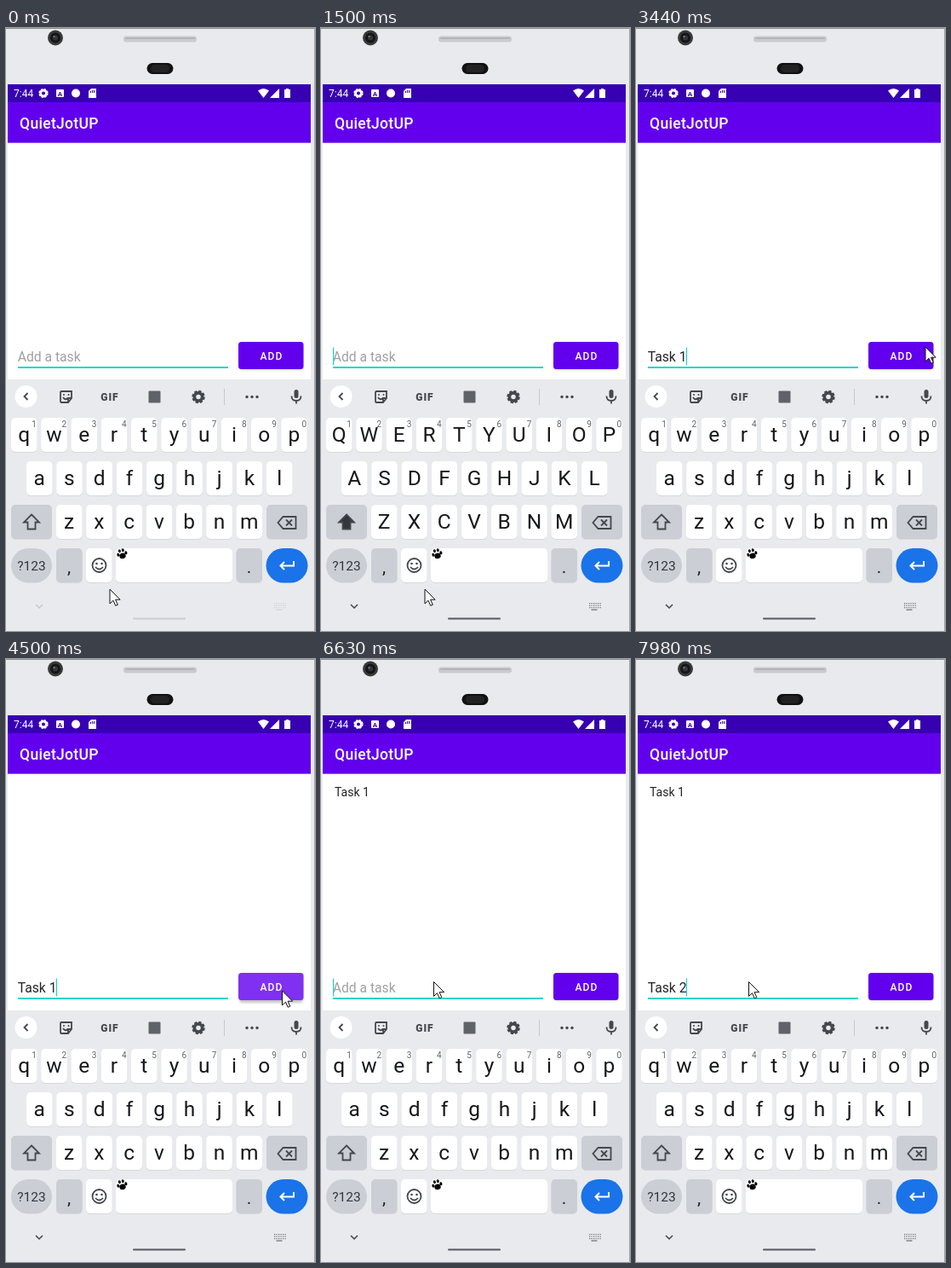
Recreate the animation shown at these times as an HTML page. Size 363x707 px, loop 8000 ms.

```html
<!DOCTYPE html>
<html lang="en">
<head>
<meta charset="utf-8">
<style>
html, body { margin: 0; width: 100%; height: 100%; overflow: hidden; background: #e8eaed; }
svg { display: block; font-family: Roboto, Arial, sans-serif; }
.key { font-size: 24.5px; text-anchor: middle; fill: #17181a; }
.digit { font-size: 10px; text-anchor: middle; fill: #5f6368; }
.line { fill: none; stroke: #44474b; stroke-width: 1.8; }
</style>
</head>
<body>
<svg id="stage" width="363" height="707" viewBox="0 0 363 707"></svg>
<script>
const LOOP = 8000;
const stage = document.getElementById('stage');

const rect = (x, y, w, h, fill, r = 0, more = '') =>
  `<rect x="${x}" y="${y}" width="${w}" height="${h}" rx="${r}" fill="${fill}" ${more}/>`;
const circle = (x, y, r, fill, more = '') =>
  `<circle cx="${x}" cy="${y}" r="${r}" fill="${fill}" ${more}/>`;
const text = (x, y, size, fill, s, more = '') =>
  `<text x="${x}" y="${y}" font-size="${size}" fill="${fill}" ${more}>${s}</text>`;
const path = (d, more = 'class="line"') => `<path d="${d}" ${more}/>`;
const fill = color => `fill="${color}"`;

function gear(x, y, r, color) {
  const step = r * Math.PI / 4;
  return circle(x, y, r * .62, 'none', `stroke="${color}" stroke-width="${r * .5}"`) +
    circle(x, y, r * .88, 'none', `stroke="${color}" stroke-width="${r * .3}" ` +
      `stroke-dasharray="${step * .55} ${step * .333}"`);
}

function phone() {
  return rect(0, 0, 363, 707, '#e8eaed') + rect(0, 0, 363, 1, '#8b8b8b') +
    rect(362, 0, 1, 707, '#a5a5a8') +
    circle(58, 11.5, 9, '#3a3a3a') + circle(58, 11.5, 6, '#161616') +
    circle(58, 11.5, 3, '#33373d') + circle(56.5, 10, 1, '#888') +
    rect(138, 9.5, 86, 7, '#cbcbce', 3) + rect(140, 11, 82, 2, '#b4b4b8', 1) +
    rect(165.5, 41, 31, 13, '#111', 6.5) + rect(170, 43, 22, 9, '#222', 4.5);
}

function bars() {
  return rect(2, 135, 356, 277, '#fff') +
    rect(2, 66, 356, 21, '#3700b3') + rect(2, 87, 356, 47.6, '#6200ee') +
    text(9, 81, 12, '#fff', '7:44') + gear(44, 76.5, 5.5, '#fff') +
    rect(59, 72, 9, 9, '#fff', 1) +
    text(63.5, 79.5, 8, '#3700b3', 'A', 'font-weight="700" text-anchor="middle"') +
    circle(82, 76.5, 5, '#fff') +
    path('M100 71h6v11h-9v-8z', fill('#fff')) +
    path('M99.5 74v2M101.5 73v3M103.5 73v3', 'stroke="#3700b3"') +
    path('M296 73.5Q302.5 68.5 309 73.5L302.5 82z', fill('#fff')) +
    path('M321 71v11h-11z', fill('#fff')) +
    path('M327 72h2v-1h3v1h2v10h-7z', fill('#fff')) +
    text(16, 118, 17.5, '#fff', 'QuietJotUP', 'font-weight="500" letter-spacing=".3"');
}

function toolbar() {
  return rect(2, 412, 356, 295, '#e8eaed') + circle(23.5, 432, 13, '#fff') +
    path('M25.5 428l-4 4 4 4') +
    path('M65 426h12v8l-4 5h-8q-1 0-1-2v-9q0-2 1-2zM77 434h-4v5M67 433q2.5 4 5.5 1') +
    circle(68, 430, 1, '#44474b') + circle(73.5, 430, 1, '#44474b') +
    text(122, 436.5, 12, '#44474b', 'GIF', 'font-weight="900" text-anchor="middle" letter-spacing="1"') +
    rect(167.5, 425.5, 14, 14, '#5f6368', 1) + gear(226, 432.5, 7.5, '#44474b') +
    rect(256, 423, 1, 19, '#c5c8cc') +
    [283, 289, 295].map(x => circle(x, 432.5, 1.7, '#44474b')).join('') +
    rect(338.5, 424, 5, 10, '#44474b', 2.5) +
    path('M335.5 431.5q0 5.5 5.5 5.5t5.5-5.5M341 437v3.5');
}

function keys() {
  const rows = [['qwertyuiop', 6, 457], ['asdfghjkl', 24, 508], ['zxcvbnm', 59, 559]];
  let out = '';
  const box = (x, y, w, color) => {
    out += rect(x, y + 1, w, 40, '#d6d8dc', 5) + rect(x, y, w, 40, color, 5);
  };
  for (const [letters, left, y] of rows) {
    [...letters].forEach((c, i) => {
      const x = left + i * 35.25;
      box(x, y, 30.5, '#fff');
      out += `<text class="key" x="${x + 15.2}" y="${y + 27.8}">${c}</text>`;
      if (y === 457) out += `<text class="digit" x="${x + 27}" y="467.5">${(i + 1) % 10}</text>`;
    });
  }
  const gray = '#cbced4';
  box(6, 559, 48, gray);
  box(306, 559, 48, gray);
  box(59, 610, 30.5, gray);
  box(94, 610, 30.5, '#fff');
  box(129, 610, 137, '#fff');
  box(270.5, 610, 30.5, gray);
  return out + rect(6, 610, 48, 40.5, gray, 20.2) + rect(305.5, 610, 49, 40.5, '#1a73e8', 20.2) +
    path('M30 570.5l9 9h-4.5v8h-9v-8h-4.5z', 'id="shift" class="line"') +
    path('M325.5 573h15v14h-15l-6-7zM329 576.5l7 7M336 576.5l-7 7') +
    text(30, 636, 15.5, '#33363a', '?123', 'text-anchor="middle"') +
    text(74, 639, 21, '#222', ',', 'text-anchor="middle"') +
    text(285.5, 639, 21, '#222', '.', 'text-anchor="middle"') +
    circle(109.5, 630, 8, 'none', 'class="line"') +
    circle(106.5, 628, 1.3, '#44474b') + circle(112.5, 628, 1.3, '#44474b') +
    path('M105 632q4.5 5 9 0') +
    path('M338 625v5.5h-15M327 626l-4.5 4.5 4.5 4.5', 'fill="none" stroke="#fff" stroke-width="2"') +
    `<g transform="rotate(-15 136.5 617)">${
      [[131.8, 616.5], [134.5, 612.5], [138.5, 612.5], [141.2, 616.5]]
        .map(([x, y]) => `<ellipse cx="${x}" cy="${y}" rx="1.5" ry="2"/>`).join('')
    }<ellipse cx="136.5" cy="619" rx="3.7" ry="3.2"/></g>`;
}

function nav() {
  let dots = '';
  for (let y = 674; y < 680; y += 2.5)
    for (let x = 315; x < 328; x += 2.5) dots += rect(x, y, 1.2, 1.2, '#6b6e72');
  return `<g id="nav">${path('M35 676l4 4 4-4', 'fill="none" stroke="#44474b" stroke-width="1.5"')}${
    dots + rect(317.5, 681.5, 7, 1.2, '#6b6e72') + rect(149, 691.5, 62, 2, '#55585c', 1)}</g>`;
}

stage.innerHTML = phone() + bars() +
  text(16, 161, 14, '#222', 'Task 1', 'id="item"') +
  text(13.7, 391, 15.7, '#222', '', 'id="field" style="white-space:pre"') +
  rect(14, 397, 247, 2, '#14d8c6') + rect(14, 374.5, 1.2, 21, '#14d8c6', 0, 'id="caret"') +
  rect(274, 370, 75, 31, '#888', 4, 'id="shadow" style="filter:blur(1.5px)"') +
  rect(273, 368, 76.5, 32, '#6200ee', 3.5, 'id="button"') +
  text(312, 388.5, 12, '#fff', 'ADD', 'font-weight="500" text-anchor="middle" letter-spacing="1.1"') +
  toolbar() + keys() + nav() +
  path('M0 0v17l4-3.8 2.7 6.1 2.6-1.1-2.7-6h5.5z',
    'id="mouse" fill="#fff" stroke="#111" stroke-linejoin="round"');

const part = id => document.getElementById(id);
const [item, field, caret, shadow, button, shift, navBar, mouse] =
  ['item', 'field', 'caret', 'shadow', 'button', 'shift', 'nav', 'mouse'].map(part);
const letters = [...document.querySelectorAll('.key')].map(el => [el, el.textContent]);

// Each track holds [start, ...values]; a value lasts until the next start.
const typed = [[0, ''], [1620, 'T'], [1770, 'Ta'], [2070, 'Tas'], [2470, 'Task'], [2720, 'Task '],
  [3010, 'Task 1'], [4890, ''], [6890, 'T'], [7010, 'Ta'], [7290, 'Tas'], [7430, 'Task'],
  [7830, 'Task '], [7980, 'Task 2']];
const caretShown = [[0, 0], [120, .6], [270, 1], [540, .4], [690, 0], [960, .6], [1110, 1],
  [3590, 0], [3970, 1], [5050, 0], [5630, 1], [6060, 0], [6630, 1]];
const capsOn = [[0, false], [1500, true], [1770, false], [6770, true], [7010, false]];
const navShown = [[0, .2], [120, .35], [270, .45], [540, .55], [690, .65], [960, .85], [1110, 1]];
const press = [[0, 0], [4350, .5], [4500, 1], [4890, .5], [5050, 0]];
const pointer = [[0, 122, 658], [3440, 340, 374], [3590, 351, 371], [3720, 342, 378],
  [3850, 331, 386], [3970, 324.5, 389], [5050, 319, 390], [5200, 287, 389], [5350, 235, 386],
  [5510, 193, 383.5], [5630, 162, 380], [5770, 140, 378.5], [5920, 132.5, 378.5]];
const at = (track, t) => track.findLast(step => step[0] <= t).slice(1);

const mix = (a, b, k) => Math.round(a + (b - a) * k);

function draw(t) {
  const [value] = at(typed, t), [caps] = at(capsOn, t), [k] = at(press, t), [x, y] = at(pointer, t);
  field.textContent = value || 'Add a task';
  field.setAttribute('fill', value ? '#222' : '#a0a0a0');
  item.style.opacity = t < 4890 ? 0 : 1;
  caret.setAttribute('x', value ? 13 + field.getComputedTextLength() : 14);
  caret.style.opacity = at(caretShown, t)[0];
  for (const [el, c] of letters) el.textContent = caps ? c.toUpperCase() : c;
  shift.style.fill = caps ? '#33363a' : 'none';
  navBar.style.opacity = at(navShown, t)[0];
  button.setAttribute('fill', `rgb(${mix(98, 127, k)},${mix(0, 48, k)},${mix(238, 240, k)})`);
  shadow.setAttribute('opacity', .4 + k * .1);
  shadow.setAttribute('height', 31 + k * 2);
  mouse.setAttribute('transform', `translate(${x} ${y})`);
}

const start = performance.now();
function tick() {
  draw((performance.now() - start) % LOOP);
  requestAnimationFrame(tick);
}
tick();
</script>
</body>
</html>
```
